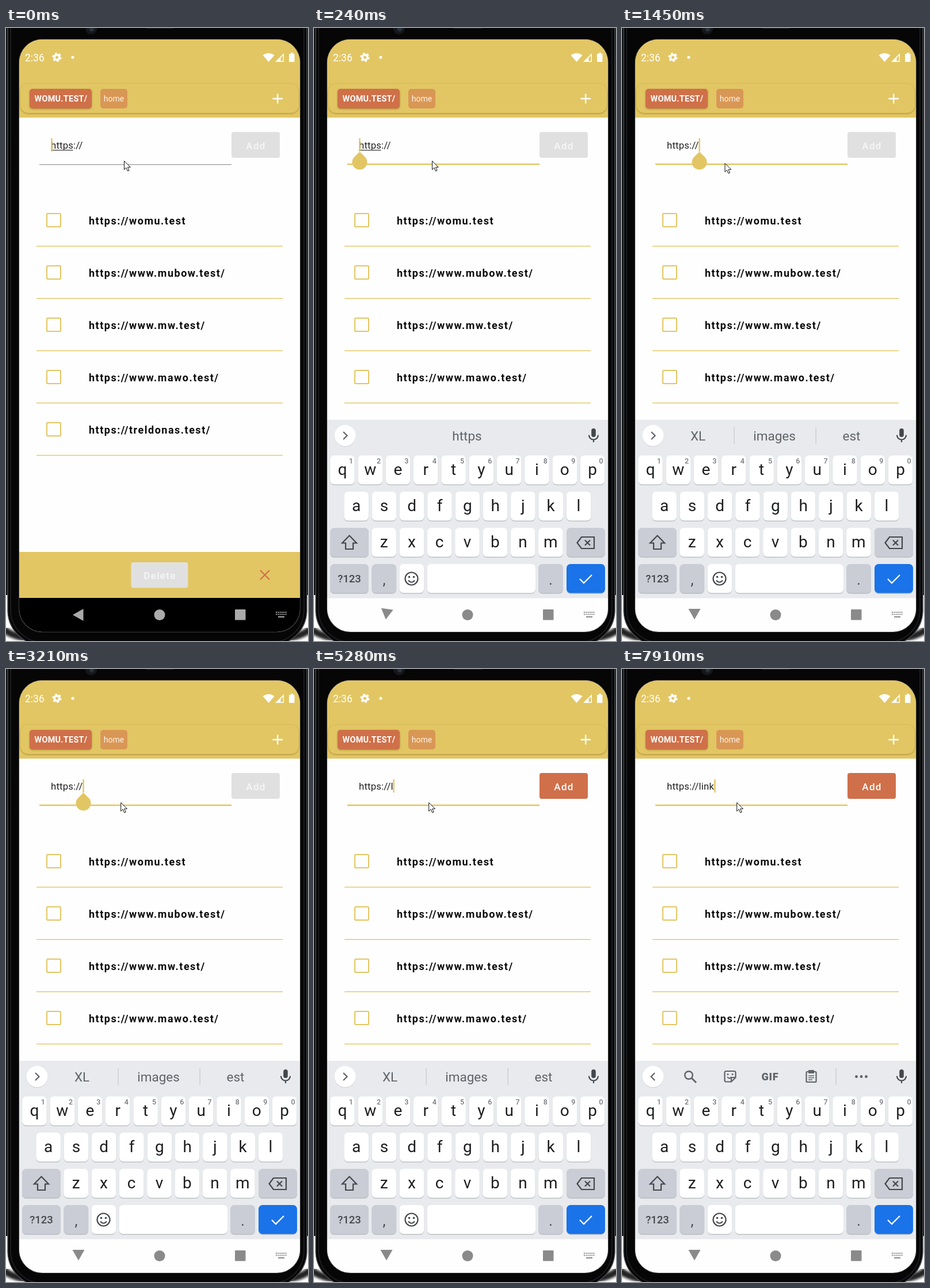
Recreate the animation shown at these times as an HTML page. Size 525x1067 px, loop 8 s.

```html
<!DOCTYPE html>
<html lang="en">
<head>
<meta charset="utf-8">
<title>Link list</title>
<style>
html, body { margin: 0; width: 100%; height: 100%; overflow: hidden; background: #0b0b0c; }
svg { display: block; width: 525px; height: 1067px; font-family: Roboto, sans-serif; }
.line { fill: none; stroke-linecap: butt; stroke-linejoin: miter; }
.mid { text-anchor: middle; }
</style>
</head>
<body>
<svg id="stage" viewBox="0 0 525 1067"></svg>
<script>
const GOLD = '#e2c663', RUST = '#cf704a', GREY = '#e0e0e0', INK = '#5f6368', DARK = '#44474b';
const LOOP = 8000;

const rect = (x, y, w, h, fill, r = 0, more = '') =>
  `<rect x="${x}" y="${y}" width="${w}" height="${h}" rx="${r}" fill="${fill}" ${more}/>`;
const circle = (x, y, r, fill, more = '') => `<circle cx="${x}" cy="${y}" r="${r}" fill="${fill}" ${more}/>`;
const text = (x, y, size, fill, str, more = '') =>
  `<text x="${x}" y="${y}" font-size="${size}" fill="${fill}" ${more}>${str}</text>`;
const line = (d, color, width = 2.2, more = '') =>
  `<path class="line" d="${d}" stroke="${color}" stroke-width="${width}" ${more}/>`;
const shape = (d, fill, more = '') => `<path d="${d}" fill="${fill}" ${more}/>`;
const group = (id, body, more = '') => `<g id="${id}" ${more}>${body}</g>`;
const MID = 'class="mid"';
const BUTTON = 'font-weight="500" letter-spacing="1.3"';

function phone() {
  return rect(0, 0, 525, 1067, '#111214') + rect(0, 987, 525, 80, '#fff') +
    line('M-4 1046Q10 1060 50 1064M529 1046Q515 1060 475 1064', '#222', 12, 'filter="url(#blur)"') +
    rect(3, -60, 520, 1135, '#060607', 62, 'stroke="#48494b" stroke-width="1.5"') +
    rect(8, -60, 510, 1129, 'none', 56, 'stroke="#1b1c1e" stroke-width="2"') +
    rect(22.5, 19.5, 489, 1032, 'none', 40, 'stroke="#3c3c3d"') +
    circle(148, 1, 10, '#15171b') + circle(149, 2, 4, '#28303c') +
    rect(242, -6, 51, 7, '#2a2a2b', 3);
}

function header() {
  const status = text(33, 58, 17.5, '#fff', '2:36') +
    circle(88.5, 51, 4.4, 'none', 'stroke="#fff" stroke-width="3.6"') +
    circle(88.5, 51, 6.7, 'none', 'stroke="#fff" stroke-width="2.8" stroke-dasharray="3.5 3.516"') +
    circle(116, 51, 2.6, '#fff') +
    shape('M446.5 47.5Q456.5 40 466.5 47.5L456.5 59Z', '#fff') +
    shape('M468 59L483 44V59Z', '#fff') + shape('M477.5 57.5V52L481.5 48V57.5Z', GOLD) +
    shape('M492 45H495V43H499V45H501.5V59H492Z', '#fff');
  return rect(23, 20, 488, 136, GOLD) + status +
    rect(25, 97, 484, 51, GOLD, 14, 'filter="url(#soft)"') +
    rect(41, 106, 108, 34, RUST, 5, 'filter="url(#soft)"') +
    text(95.5, 128, 14.4, '#fff', 'WOMU.TEST/', MID + ' font-weight="700" letter-spacing=".3"') +
    rect(164, 106, 47, 34, '#d99755', 5) +
    text(187.5, 128, 14, '#fdf3e6', 'home', MID) +
    line('M463.5 123H481M472.25 114.5V131.5', '#fff', 2.3);
}

function list() {
  return ['womu.test', 'www.mubow.test/', 'www.mw.test/', 'www.mawo.test/', 'treldonas.test/'].map((host, i) => {
    const y = 91 * i;
    return rect(71, 323, 24, 23, 'none', 1.5, `stroke="${GOLD}" stroke-width="2" transform="translate(0 ${y})"`) +
      text(144, 341.5 + y, 18, '#0a0a0a', 'https://' + host, 'font-weight="700" letter-spacing="1.5"') +
      rect(53, 379 + y, 428, 1.4, GOLD);
  }).join('');
}

function footer() {
  return rect(23, 912, 488, 80, GOLD) + rect(217.4, 930, 99, 44.5, GREY, 4) +
    text(267.5, 959, 17, '#f6f6f6', 'Delete', MID + BUTTON) +
    line('M442 944L458 960M458 944L442 960', RUST) +
    rect(23, 992, 488, 60, '#000');
}

function navIcons() {
  const dots = Array.from({ length: 12 }, (_, i) =>
    rect(469 + i % 6 * 3.3, 1016 + (i > 5) * 3.6, 2, 2, 'inherit')).join('');
  return (shape('M115.5 1011H136.5L126 1029.5Z', 'inherit', 'id="back"') +
    circle(267, 1021.5, 9.5, 'inherit') + rect(398, 1012, 18.5, 18.5, 'inherit', 1) +
    dots + rect(473, 1024, 11, 2, 'inherit')).replaceAll('fill="inherit"', '');
}

function field() {
  return rect(392, 181, 84, 45, GREY, 4, 'id="add"') +
    text(434.5, 211, 17, '#f6f6f6', 'Add', 'id="addText" ' + MID + BUTTON) +
    text(78, 210, 16.8, '#222', '', 'id="url" letter-spacing=".15"') +
    rect(78, 212, 38.5, 1.2, '#333', 0, 'id="compose"') +
    rect(58, 237, 334, 1, '#888', 0, 'id="base"') +
    rect(0, 192, 2.4, 23, GOLD, 0, 'id="caret"') +
    shape('M0 0L9.2 9.2A13 13 0 1 1 -9.2 9.2Z', GOLD, 'id="handle"');
}

function key(x, y, w, fill = '#fff') {
  return rect(x, y + 1.2, w, 50.5, '#b4b7bc', 7) + rect(x, y, w, 50.5, fill, 7);
}

function letters(row, firstX, y) {
  return [...row].map((ch, i) => {
    const x = firstX + 48.3 * i;
    return key(x - 21.3, y, 42.6) + text(x, y + 34, 28, '#1d1e20', ch, MID);
  }).join('');
}

function suggestions() {
  const word = (x, str) => text(x, 718, 22.5, INK, str, MID);
  const split = x => rect(x - .5, 695, 1.2, 29, '#c3c6cb');
  const tools = circle(116, 707, 6.8, 'none', `stroke="${INK}" stroke-width="2.4"`) +
    line('M121 712L129 720', INK, 2.8) +
    line('M181 700H195Q197.5 700 197.5 702.5V711L190 718.5H181Q178.5 718.5 178.5 716V702.5Q178.5 700 181 700ZM197 711H190V718', INK) +
    line('M183 710Q187 715 190 710', INK, 1.8) + circle(184, 705.5, 1.5, INK) + circle(192, 705.5, 1.5, INK) +
    text(257.5, 715.5, 18, INK, 'GIF', MID + ' font-weight="900" letter-spacing=".8"') +
    rect(320.5, 701, 17, 18, 'none', 1.5, `stroke="${INK}" stroke-width="2.2"`) +
    rect(324, 698, 10, 6, INK, 1) + line('M324 708H334M324 711.5H334M324 715H331', INK, 1.7) +
    split(372) + [407.5, 416, 424.5].map(x => circle(x, 709.5, 2.4, INK)).join('');
  return circle(54, 710.5, 18.5, '#b9bcc2', 'opacity=".6"') + circle(54, 709.5, 18.5, '#fff') +
    line('M51 703L57.5 709.5L51 716', INK, 2.2, 'id="chevron"') +
    group('https', word(266, 'https')) +
    group('words', word(132, 'XL') + word(265, 'images') + word(399, 'est') + split(195) + split(337)) +
    group('tools', tools) +
    rect(482.2, 697, 7.6, 15, DARK, 3.8) +
    line('M478 708.5A8 8 0 0 0 494 708.5M486 716V721', DARK);
}

function keyboard() {
  const soft = '#cacdd5';
  const digits = [...'1234567890'].map((n, i) =>
    text(64.3 + 48.3 * i, 758, 12.5, '#75787c', n, MID + ' font-weight="500"')).join('');
  return rect(23, 682, 488, 311, '#e8eaed') + suggestions() +
    letters('qwertyuiop', 49.4, 744) + digits +
    letters('asdfghjkl', 73.6, 807) +
    letters('zxcvbnm', 121.6, 870) +
    key(28, 870, 67, soft) + line('M61.5 883.5L74 896.5H68V907H55V896.5H49Z', DARK) +
    key(439, 870, 67, soft) +
    line('M457.5 896L465 886H487V906H465ZM471 891.5L480 900.5M480 891.5L471 900.5', DARK) +
    key(28, 933, 67, soft) + text(61.5, 965, 18.5, DARK, '?123', MID + ' font-weight="500"') +
    key(100.5, 933, 42.6, soft) + text(122, 969, 25, DARK, ',', MID) +
    key(148.5, 933, 42.6) + circle(169.5, 958.5, 11, 'none', `stroke="${DARK}" stroke-width="2.2"`) +
    circle(165.5, 955.5, 1.8, DARK) + circle(173.5, 955.5, 1.8, DARK) +
    line('M164 961.5Q169.5 968 175 961.5', DARK, 2) +
    key(196.5, 933, 188.5) +
    key(390, 933, 43, soft) + text(411.5, 969, 25, DARK, '.', MID) +
    key(439, 933, 67, '#1a73e8') + line('M462 959L469 966L483 952', '#fff', 2.4) +
    rect(23, 992.5, 488, 60, '#fefefe');
}

document.getElementById('stage').innerHTML = `<defs>
  <clipPath id="screen">${rect(23, 20, 488, 1031, '#000', 40)}</clipPath>
  <filter id="blur"><feGaussianBlur stdDeviation="2"/></filter>
  <filter id="soft" x="-10%" y="-30%" width="120%" height="170%">
    <feDropShadow dx="0" dy="1" stdDeviation="1.4" flood-color="#6b4a00" flood-opacity=".5"/>
  </filter></defs>` + phone() +
  `<g clip-path="url(#screen)">${rect(23, 20, 488, 1031, '#fefefe')}${header()}${field()}${list()}` +
  group('footer', footer()) + group('keyboard', keyboard()) +
  '<use id="ghost" href="#footer" opacity=".2"/>' + group('nav', navIcons()) + '</g>' +
  group('mouse', shape('M.5 .5V15.5L4 12.2L6.5 18L9 17L6.5 11.3H11.3Z', '#fff', 'stroke="#111"'));

// Each track holds [start time, value] steps.
const tracks = {
  typed: [[0, ''], [5130, 'l'], [7230, 'li'], [7630, 'lin'], [7910, 'link']],
  caretX: [[0, 78.2], [1060, 91], [1180, 117], [1300, 133.4], [5130, 137.4], [7230, 141.4], [7630, 151], [7910, 160.2]],
  caretOn: [[0, 1], [630, 0], [1060, 1], [1720, 0], [2150, 1], [2680, 0], [3210, 1], [3740, 0], [4140, 1],
    [4730, 0], [5130, 1], [5650, 0], [6270, 1], [6640, 0], [7230, 1]],
  bar: [[0, 'https'], [1060, 'tools'], [1450, 'words'], [5400, 'none'], [7230, 'tools']],
  mouse: [[0, [205, 231]], [390, [168, 231]], [510, [130, 229]], [630, [101, 228]], [780, [81, 228]],
    [1060, [95, 231]], [1180, [128, 233]], [1300, [160, 235]], [1450, [178.5, 235]], [1720, [200, 233]], [2000, [199.2, 232]]],
  slide: [[0, 370], [120, 85], [240, 0]],
  backTurn: [[0, 90], [240, 8], [390, 0]]
};
const at = (name, t) => tracks[name].findLast(step => step[0] <= t)[1];

const el = id => document.getElementById(id);
const set = (id, attrs) => Object.entries(attrs).forEach(([k, v]) => el(id).setAttribute(k, v));
const show = (id, on) => set(id, { display: on ? 'inline' : 'none' });

function draw(t) {
  const caretX = at('caretX', t), bar = at('bar', t), slide = at('slide', t);
  const focused = t >= 120, ready = t >= 5280;

  el('url').textContent = 'https://' + at('typed', t);
  show('compose', t < 1060);
  set('base', focused ? { y: 235.9, height: 2.5, fill: GOLD } : { y: 237.2, height: 1.1, fill: '#888' });
  set('caret', { x: caretX });
  show('caret', at('caretOn', t));
  set('handle', { transform: `translate(${caretX + 1.2} 215.2)` });
  show('handle', focused && t < 5130);
  set('add', { fill: ready ? RUST : GREY });
  set('addText', { fill: ready ? '#fff' : '#f6f6f6' });

  show('keyboard', focused);
  set('keyboard', { transform: `translate(0 ${slide})` });
  show('ghost', focused && slide > 0);
  set('nav', { fill: focused ? '#8a8a8a' : '#aaa' });
  set('back', { transform: `rotate(${at('backTurn', t)} 125 1020.5)` });
  ['https', 'words', 'tools'].forEach(id => show(id, id === bar));
  set('chevron', { transform: bar === 'tools' ? 'rotate(180 54 709.5)' : '' });
  set('mouse', { transform: `translate(${at('mouse', t)})` });
}

function frame(now) {
  draw(now % LOOP);
  requestAnimationFrame(frame);
}
draw(0);
requestAnimationFrame(frame);
</script>
</body>
</html>
```
